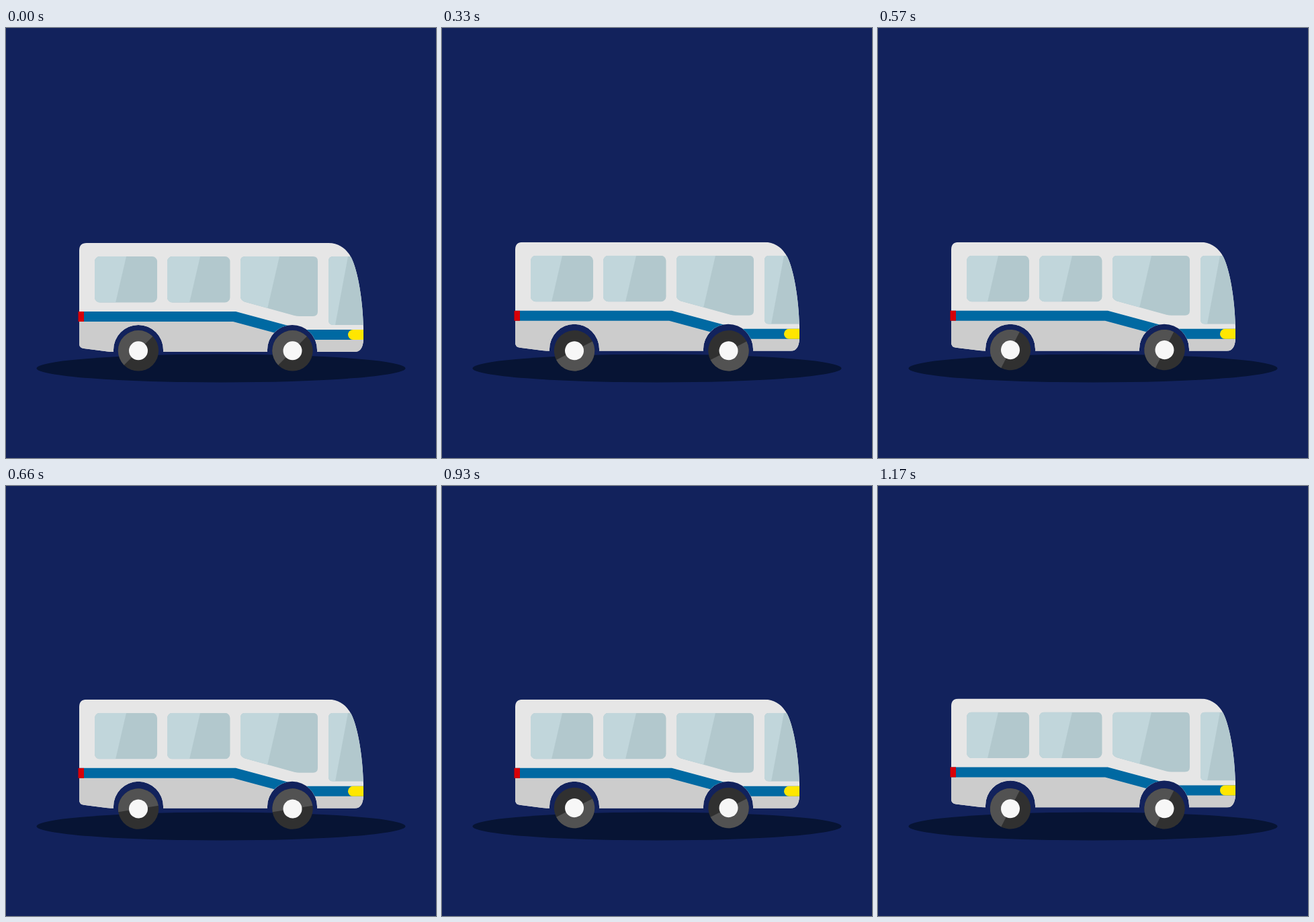
Animation, 640 px wide and 640 px high, one loop 1.2 s. Source, as an HTML page:

```html
<!DOCTYPE html>
<html lang="en">
<head>
<meta charset="utf-8">
<title>Bus</title>
<style>
html, body { margin: 0; width: 100%; height: 100%; overflow: hidden; background: #12225c; }
svg { display: block; width: 100%; height: 100%; }
</style>
</head>
<body>
<svg viewBox="0 0 640 640">
  <defs>
    <clipPath id="shell">
      <path d="M120 320H480C498 320 508 331 514 342C524 362 531 405 532 445V464Q531 482 519 482H463V479A37 37 0 0 0 389 479V482H234V479A37 37 0 0 0 160 479V482Q156 482 151 481.4L116 477Q109 476 109 470V331Q109 320 120 320Z"/>
    </clipPath>
    <clipPath id="panes">
      <rect x="132" y="340" width="93" height="68.5" rx="7.5"/>
      <rect x="240" y="340" width="93.5" height="68.5" rx="7.5"/>
      <path d="M356 340H457Q464 340 464 347V422Q464 429 457 429H437Q433 429 429 428L355 407.5Q349 405 349 400V347Q349 340 356 340Z"/>
      <path d="M487 340H540V442H487Q480 442 480 435V347Q480 340 487 340Z"/>
    </clipPath>
    <g id="wheel">
      <circle r="30.2" fill="#303030"/>
      <path d="M-30.2 0A30.2 30.2 0 0 1 30.2 0Z" fill="#525252"/>
      <circle r="14" fill="#f7f7f7"/>
    </g>
  </defs>
  <rect width="640" height="640" fill="#12225c"/>
  <ellipse cx="320" cy="506.5" rx="274.5" ry="21" fill="#071434"/>
  <g id="bus">
    <g clip-path="url(#shell)">
      <rect x="100" y="310" width="440" height="180" fill="#e6e6e6"/>
      <path d="M100 430H340L440 457H540V490H100Z" fill="#ccc"/>
      <path d="M100 422H342L442 449H540V464H438L338 437H100Z" fill="#0069a2"/>
      <g clip-path="url(#panes)">
        <rect x="130" y="338" width="410" height="106" fill="#b2c8cd"/>
        <path d="M130 340H179L163 409H130ZM238 340H289L273 409H238ZM347 340H407L389 418H347ZM478 340H509L490 442H478Z" fill="#c1d6db"/>
      </g>
      <path d="M540 449H516.5A7.5 7.5 0 0 0 516.5 464H540Z" fill="#ffe600"/>
    </g>
    <rect x="107.5" y="422" width="8.5" height="15" fill="#d80007"/>
  </g>
  <use class="wheel" href="#wheel"/>
  <use class="wheel" href="#wheel"/>
</svg>
<script>
const LOOP = 1200, STEP = 30, TURN = 600;
const bus = document.getElementById('bus');
const wheels = document.querySelectorAll('.wheel');
const axles = [197, 426.5];

// [time, vertical offset]
const lift = [[0, 0], [180, -0.6], [330, -1.2], [480, -2.2], [570, -1.3], [750, -3], [930, -2.2], [1080, -3.6], [LOOP, -3.6]];
const bob = [[0, 0], [330, 0], [450, 0.7], [570, -1.2], [690, 0.7], [750, 0], [930, -1.2], [1080, 0], [LOOP, 0]];

function track(keys, t) {
  const i = keys.findIndex(k => k[0] > t);
  const [t0, y0] = keys[i - 1], [t1, y1] = keys[i];
  return y0 + (y1 - y0) * (t - t0) / (t1 - t0);
}

function draw(now) {
  const t = Math.floor((now % LOOP) / STEP) * STEP;
  bus.setAttribute('transform', `translate(0 ${track(lift, t)})`);
  const y = 480.3 + track(bob, t);
  const angle = 360 * t / TURN - 45;
  wheels.forEach((w, i) => w.setAttribute('transform', `translate(${axles[i]} ${y}) rotate(${angle})`));
}

const start = performance.now();
function tick() {
  draw(performance.now() - start);
  requestAnimationFrame(tick);
}
tick();
</script>
</body>
</html>
```
